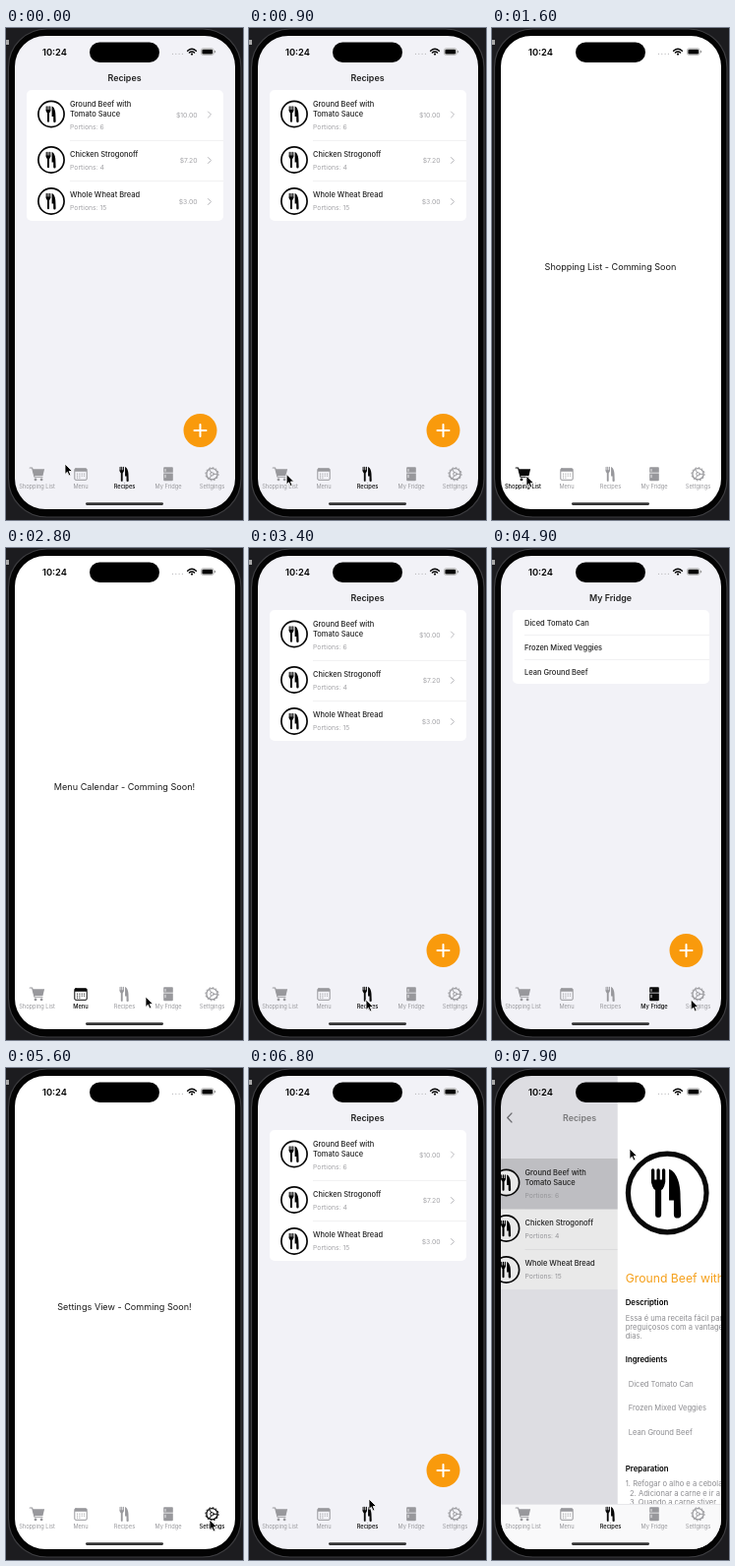
Animation of 241 by 500 pixels, one loop 8 s. Source, as an HTML page:

```html
<!DOCTYPE html>
<html lang="en">
<head>
<meta charset="utf-8">
<title>Recipe app</title>
<style>
html, body { margin: 0; height: 100%; overflow: hidden; background: #1c1c1f; }
svg { display: block; width: 100%; height: 100%; font-family: Inter, Roboto, sans-serif; }
.gray { fill: #a3a3a7; }
.title { font-size: 8.9px; font-weight: 600; text-anchor: middle; fill: #222; }
.name { font-size: 7.5px; font-weight: 500; fill: #222; }
.small { font-size: 6.8px; }
.body { font-size: 7.6px; fill: #8c8c90; }
.head { font-size: 7.8px; font-weight: 600; }
.tab { color: #98989c; font-size: 5.7px; text-anchor: middle; fill: currentColor; }
.tab.on { color: #080808; font-weight: 500; }
.line { fill: none; stroke: currentColor; stroke-linecap: round; stroke-linejoin: round; }
</style>
</head>
<body>
<svg id="stage" viewBox="0 0 241 500" preserveAspectRatio="none"></svg>
<script>
const text = (x, y, str, cls = '', attrs = '') => `<text x="${x}" y="${y}" class="${cls}" ${attrs}>${str}</text>`;
const rect = (x, y, w, h, fill, attrs = '') => `<rect x="${x}" y="${y}" width="${w}" height="${h}" fill="${fill}" ${attrs}/>`;
const line = (d, width = 1, attrs = '') => `<path d="${d}" class="line" stroke-width="${width}" ${attrs}/>`;
const use = (id, x, y, s = 1) => `<use href="#${id}" transform="translate(${x} ${y}) scale(${s})"/>`;

const cutlery = `<g id="cutlery">
  ${line('M-4.8-7.6V-3.6M-3-7.6V-3.6M-1.2-7.6V-3.6', 1.1)}
  <path d="M-5.3-4.4H-.7Q-.7-1.6-2-1V7.2a1 1 0 0 1-2 0V-1Q-5.3-1.6-5.3-4.4Z"/>
  <path d="M.6-8C3.4-7 4.6-2.5 4.4 2L4.6 7.2a1.2 1.2 0 0 1-2.4 0V2.5H.6Z"/></g>`;

const badge = `<g id="badge"><circle r="13.1" fill="#fff" stroke="#080808" stroke-width="1.7"/><use href="#cutlery"/></g>`;

const chevron = (x, y) => line(`M${x} ${y - 3}l3 3-3 3`, 1, 'color="#b9b9bd"');

const plus = `<g><circle cx="197.5" cy="409" r="17" fill="#f99a0c"/>
  ${line('M191.5 409h12M197.5 403v12', 2, 'color="#fff"')}</g>`;

// Recipe rows: icon y, name lines with their baselines, portions, price
const row = (y, names, portions, price) => use('badge', 46, y + .5) +
  names.map(([ny, str]) => text(65, ny, str, 'name')).join('') +
  text(65, names.at(-1)[0] + 13.3, 'Portions: ' + portions, 'small gray') +
  text(194.5, y + 3.5, price, 'small gray', 'text-anchor="end"') + chevron(205.5, y + 1);

const rule = y => rect(65, y, 156, .5, '#e2e2e5');

const list = `<g id="list">
  ${rect(9, 8, 224, 481, '#f2f2f7')}
  ${text(120.5, 53.5, 'Recipes', 'title', 'id="heading"')}
  <g id="card">
    ${rect(21, 63, 200, 133, '#fff', 'rx="5"')}
    ${rect(21, 63, 200, 51.5, '#d0d0d4', 'rx="5" id="pressed"')}
    ${rule(114.5)}${rule(155.5)}
    ${row(87, [[79.7, 'Ground Beef with'], [89.7, 'Tomato Sauce']], 6, '$10.00')}
    ${row(133.5, [[130.7, 'Chicken Strogonoff']], 4, '$7.20')}
    ${row(175.5, [[171.9, 'Whole Wheat Bread']], 15, '$3.00')}
  </g>
  ${plus}
</g>`;

const goods = ['Diced Tomato Can', 'Frozen Mixed Veggies', 'Lean Ground Beef'];
const fridge = `<g id="fridge">
  ${rect(9, 8, 224, 481, '#f2f2f7')}
  ${text(120.5, 53.5, 'My Fridge', 'title')}
  ${rect(21, 63, 200, 75, '#fff', 'rx="5"')}
  ${goods.map((g, i) => text(33, 78.5 + 25 * i, g, 'name')).join('')}
  ${rect(33, 88, 188, .5, '#e2e2e5')}${rect(33, 113, 188, .5, '#e2e2e5')}
  ${plus}
</g>`;

const message = `<g id="message">
  ${rect(9, 8, 224, 481, '#fff')}
  ${text(120.5, 245.5, '', '', 'id="note" font-size="9.1" fill="#1a1a1a" text-anchor="middle"')}
</g>`;

const lines = (x, y, step, cls, strs) => strs.map((s, i) => text(x, y + step * i, s, cls)).join('');
const detail = `<g id="detail">
  ${rect(9, 8, 224, 481, '#fff')}
  ${use('badge', 59.5, 127, 3.04)}
  ${text(17, 217.5, 'Ground Beef with Tomato Sauce', '', 'font-size="12.2" fill="#f5a01c"')}
  ${text(17, 240.8, 'Description', 'head')}
  ${lines(17, 256.5, 9.3, 'body', ['Essa é uma receita fácil para', 'preguiçosos com a vantagem', 'dias.'])}
  ${text(17, 298.8, 'Ingredients', 'head')}
  ${lines(20, 323.5, 24.6, 'body', goods)}
  ${text(17, 409.8, 'Preparation', 'head')}
  ${lines(17, 425, 9.6, 'body', ['1. Refogar o alho e a cebola', '&#160; 2. Adicionar a carne e ir a', '&#160; 3. Quando a carne stiver'])}
</g>`;

const icons = [
  line('M-7.3-6.3h2.4L-2.5 3H5.5', 1.1) +
    '<path d="M-4.6-5H7.6L6 1.6H-3Z"/><circle cx="-1.5" cy="5.6" r="1.4"/><circle cx="4.6" cy="5.6" r="1.4"/>',
  line('M-5-5.6H5Q6.2-5.6 6.2-4.4V4.8Q6.2 6 5 6H-5Q-6.2 6-6.2 4.8V-4.4Q-6.2-5.6-5-5.6Z', 1) +
    '<path d="M-6-5.4H6V-2.6H-6Z"/>' +
    line('M-3.4-.2h6.9M-3.4 1.8h6.9M-3.4 3.8h4.6', 1.2, 'stroke-dasharray="0 2.3"'),
  use('cutlery', 0, 0, .92),
  '<path d="M-4-7H4Q4.8-7 4.8-6.2V-1.6H-4.8V-6.2Q-4.8-7-4-7ZM-4.8-.8H4.8V6Q4.8 7 4 7H-4Q-4.8 7-4.8 6Z"/>' +
    line('M-3-4.8v1.8M-3 1v2.4', .9, 'color="#f4f4f6"'),
  '<circle r="5.6" class="line" stroke-width="1.3"/>' +
    '<circle r="6.6" class="line" style="stroke-linecap:butt" stroke-width="1" stroke-dasharray="1.73"/>' +
    '<circle r="1.7" class="line" stroke-width="1"/>' + line('M1.8 0H5M-.9-1.6L-2.6-4.4M-.9 1.6L-2.6 4.4', 1)
];
const labels = ['Shopping List', 'Menu', 'Recipes', 'My Fridge', 'Settgings'];
const tabs = labels.map((label, i) => {
  const x = 31.5 + 44.5 * i;
  return `<g class="tab"><g transform="translate(${x} 453.3)">${icons[i]}</g>${text(x, 468, label)}</g>`;
}).join('');

const status = text(37, 28, '10:24', '', 'font-size="9.3" font-weight="600"') +
  rect(85, 14.5, 71, 20.5, '#000', 'rx="10.2"') +
  line('M169.5 26.3H180', 1.3, 'color="#b5b5b8" stroke-dasharray="0 3.3"') +
  line('M184.6 23.2Q189 19.4 193.4 23.2M186.4 25Q189 22.8 191.6 25', 1.4) +
  '<circle cx="189" cy="26.6" r="1.1"/>' +
  rect(198.4, 20.8, 12.8, 6.6, '#fff', 'rx="2" stroke="#999" stroke-width=".7"') +
  rect(199.4, 21.8, 10.8, 4.6, '#000', 'rx="1.2"') + rect(212.2, 23, .9, 2.2, '#888');

const stage = document.getElementById('stage');
stage.innerHTML = `
  <defs>${cutlery}${badge}<clipPath id="screen">${rect(9, 8, 224, 481, '#000', 'rx="31"')}</clipPath></defs>
  ${rect(0, 0, 241, 500, '#1c1c1f')}${rect(0, 12, 3, 5, '#a8a8a8')}
  ${rect(2.5, 1, 236.5, 496, '#030303', 'rx="39" stroke="#3d3d40" stroke-width="1.2"')}
  <g clip-path="url(#screen)">
    ${list}${fridge}${message}
    ${rect(9, 8, 224, 481, '#000', 'id="dim"')}${detail}
    <g id="back">${rect(9, 443, 224, 46, '#f9f9fa')}${rect(9, 443, 224, .5, '#d5d5d8')}
      ${line('M20 46l-4.3 4.5 4.3 4.5', 1.2, 'color="#6a6a6e"')}</g>
    ${status}${tabs}${rect(81, 482.3, 79, 2.6, '#333', 'rx="1.3"')}
  </g>
  <path id="cursor" d="M0 0V10.5L2.4 8.2 4 12 5.8 11.2 4.2 7.5H7.5Z" fill="#000" stroke="#fff" stroke-width=".8"/>`;

const el = id => document.getElementById(id);
const show = (id, on) => el(id).style.display = on ? '' : 'none';
const move = (id, x, y) => el(id).setAttribute('transform', `translate(${x} ${y})`);
const tabEls = stage.querySelectorAll('.tab');

const notes = { 0: 'Shopping List - Comming Soon', 1: 'Menu Calendar - Comming Soon!', 4: 'Settings View - Comming Soon!' };
const taps = [[0, 2], [1300, 0], [2400, 1], [3300, 2], [4500, 3], [5500, 4], [6800, 2]];
const path = [
  [0, 60, 443], [200, 60, 443], [1100, 35, 455], [1600, 35, 455], [2000, 63, 459], [2200, 72, 459],
  [2400, 72, 459], [2800, 142, 456], [3100, 119, 459], [3500, 119, 459], [4200, 162, 458], [4500, 162, 458],
  [5000, 207, 459], [5600, 207, 459], [6000, 111, 462], [6200, 119, 462], [6500, 119, 462],
  [6600, 119, 460], [6700, 119, 460], [6800, 122, 438], [7500, 140, 82], [8000, 140, 82]
];

function pointer(t) {
  const i = path.findIndex(k => k[0] > t);
  const [t0, x0, y0] = path[i - 1], [t1, x1, y1] = path[i];
  const u = (t - t0) / (t1 - t0), e = u * u * (3 - 2 * u);
  return [x0 + (x1 - x0) * e, y0 + (y1 - y0) * e];
}

function draw(now) {
  const t = Math.floor(now % 8000 / 100) * 100;
  const tab = taps.findLast(k => k[0] <= t)[1];
  const push = t > 7600 ? .47 * ((t - 7600) / 300) ** 1.4 : 0;

  tabEls.forEach((g, i) => g.classList.toggle('on', i === tab));
  show('list', tab === 2);
  show('fridge', tab === 3);
  show('message', tab in notes);
  el('note').textContent = notes[tab] || '';

  show('pressed', t >= 7600);
  show('detail', push > 0);
  show('back', push > 0);
  move('list', -67 * push, 0);
  move('card', 0, push ? 29 : 0);
  move('detail', 224 * (1 - push), 0);
  el('dim').setAttribute('opacity', .18 * push);
  el('heading').setAttribute('opacity', 1 - push);
  move('cursor', ...pointer(t));
  requestAnimationFrame(draw);
}
draw(0);
</script>
</body>
</html>
```
